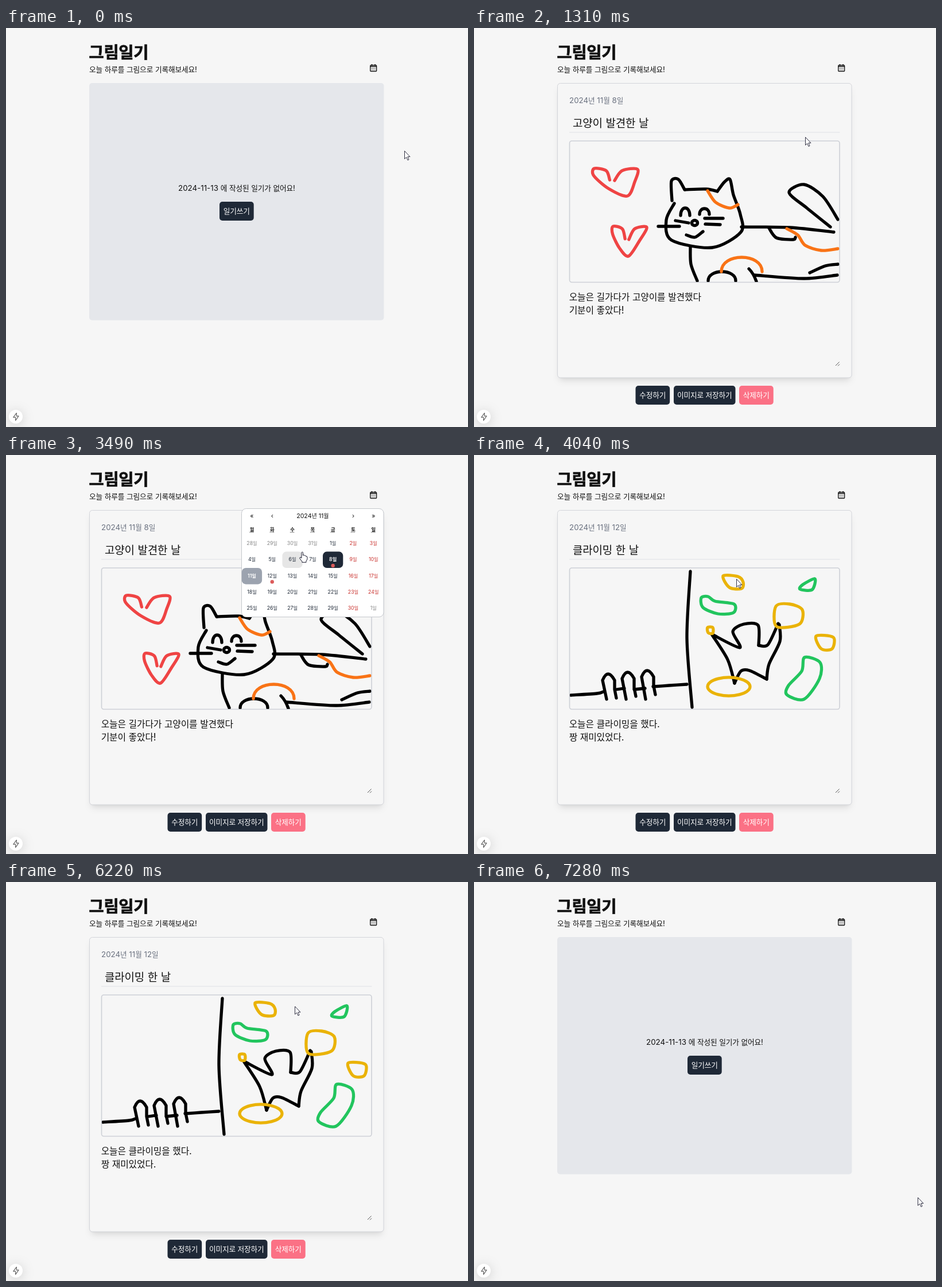
An HTML page that plays this animation: 805x696 px, repeating every 7330 ms.

```html
<!DOCTYPE html>
<html lang="ko">
<head>
<meta charset="utf-8">
<title>그림일기</title>
<style>
  html, body { margin: 0; width: 100%; height: 100%; overflow: hidden; background: #f6f6f6; }
  svg { display: block; }
  text { font-family: Inter, "Noto Sans CJK KR", "Noto Sans CJK", sans-serif; font-size: 13.33px; fill: #111; white-space: pre; }
  .ko { font-size: .95em; letter-spacing: -.01em; word-spacing: .025em; }
  .mid { text-anchor: middle; }
  .white { fill: #fff; font-weight: 500; }
  .title { font-size: 30px; font-weight: 800; stroke: #111; stroke-width: .7; }
  .date { fill: #6b7280; }
  .subject { font-size: 20px; }
  .body { font-size: 16.67px; }
  .btn { fill: #1f2937; }
  .danger { fill: #fb7185; }
  .month { font-size: 10.6px; }
  .day { font-size: 8.7px; fill: #1f2937; }
  .head { font-weight: 700; fill: #111; }
  .weekend { fill: #c9302c; }
  .other { fill: #858585; }
  .on { fill: #fff; font-weight: 600; }
  .ink path { fill: none; stroke-width: 5.3; stroke-linecap: round; stroke-linejoin: round; }
  .shade { filter: drop-shadow(0 8px 6px rgba(0, 0, 0, .1)) drop-shadow(0 3px 2.500px rgba(0, 0, 0, .06)); }
  .badge { filter: drop-shadow(0 3px 10px rgba(0, 0, 0, .17)); }
</style>
</head>
<body>
<svg width="805" height="696" viewBox="0 0 805 696">
  <defs><clipPath id="paper"><rect x="167" y="198" width="469.500" height="245"/></clipPath></defs>

  <text class="title" x="144.500" y="52.500">그림일기</text>
  <text x="145" y="76.800">오늘 하루를 그림으로 기록해보세요!</text>
  <rect id="iconHover" x="621" y="56" width="37" height="27" fill="#e5e7eb"/>
  <g fill="none" stroke="#111" stroke-width="1.400">
    <rect x="634.800" y="65" width="10.800" height="10.500" rx="1"/>
    <path d="M635 67.300H645.500M637.500 63V66M643 63V66"/>
    <path d="M637 70.400H644M637 73H644" stroke-width="1.200" stroke-dasharray="1.200 1.400"/>
  </g>

  <g id="empty">
    <rect x="145" y="96" width="513.500" height="413.700" rx="5" fill="#e5e7eb"/>
    <text class="mid" x="402" y="284">2024-11-13 에 작성된 일기가 없어요!</text>
    <rect class="btn" x="372" y="303" width="59.700" height="33" rx="5"/>
    <text class="mid white" x="401.800" y="323.800">일기쓰기</text>
  </g>

  <g id="diary">
    <rect class="shade" x="148" y="99" width="507.500" height="508.500" rx="5" fill="#f6f6f6"/>
    <rect x="145.500" y="96.500" width="512.500" height="513.500" rx="5" fill="#f6f6f6" stroke="#d3d5da"/>
    <path d="M166 182H637.500" stroke="#dfe1e5"/>
    <rect x="166.500" y="197" width="470.500" height="246.500" rx="4" fill="none" stroke="#cdd0d6" stroke-width="1.600"/>
    <path d="M630 589L636.500 582.500M634 589.500L637 586.500" stroke="#555"/>
    <g id="buttons"></g>
    <g id="cat"></g>
    <g id="climb"></g>
  </g>

  <g id="calendar">
    <rect x="410.500" y="93.500" width="247.500" height="189" rx="8" fill="#fff" stroke="#c4c7cc"/>
    <g id="nav"></g>
    <g id="days"></g>
  </g>

  <circle class="badge" cx="17" cy="678" r="12" fill="#fff"/>
  <path d="M18.300 671.500L12.800 679.200H16.600V684.600L22 676.800H18.300Z" fill="none" stroke="#666" stroke-width="1.200" stroke-linejoin="round"/>

  <g id="cursor" fill="#fff" stroke="#1a1a2e" stroke-linejoin="round">
    <path id="arrow" d="M.5 .5V14.300L3.700 11.400L5.900 16.500L8 15.600L5.900 10.600H10Z" stroke-width=".9"/>
    <path id="hand" d="M-1.500 11V1.800Q-1.500 .5-.2 .5T1.100 1.800V6.500Q1.500 5.500 2.800 5.800T4 7Q5 6.300 6 7.200V8Q8.500 7.500 8.500 9.500V13L6.500 16.500V18.500H-.5V17L-4.500 11.800Q-5 9.800-3.400 9.600Z"/>
  </g>
</svg>
<script>
const LOOP = 7330;
const $ = id => document.getElementById(id);
// "inherit" keeps children of a hidden group hidden
const show = (id, on) => $(id).setAttribute('visibility', on ? 'inherit' : 'hidden');
const label = (cls, x, y, str) => `<text class="${cls}" x="${x}" y="${y}">${str}</text>`;
const range = n => [...Array(n).keys()];

// Smooth line through "x,y x,y ..." points; a trailing z closes it
function curve(str) {
  const closed = str.endsWith('z');
  const p = str.replace('z', '').split(' ').map(s => s.split(',').map(Number));
  const n = p.length, k = 0.15;
  const pt = i => closed ? p[(i + n) % n] : p[Math.max(0, Math.min(n - 1, i))];
  let d = `M${p[0]}`;
  for (let i = 1; i < n + closed; i++) {
    const a = pt(i - 1), b = pt(i);
    const c1 = a.map((v, j) => v + (b[j] - pt(i - 2)[j]) * k);
    const c2 = b.map((v, j) => v - (pt(i + 1)[j] - a[j]) * k);
    d += `C${c1} ${c2} ${b}`;
  }
  return d;
}
const arch = (x, y, w, h) => `M${x} ${y}c0 ${-h * 4 / 3} ${w} ${-h * 4 / 3} ${w} 0`;
const oval = (x, y, rx, ry) => `M${x - rx} ${y}a${rx} ${ry} 0 1 1 0 .1z`;
const heart = (x, y, w, h, tip) => curve([
  [.37, .43], [.29, .1], [.02, .02], [.01, .28], [tip * .45, .74], [tip, 1],
  [tip * .5 + .55, .5], [1, .05], [.65, .1], [.48, .45]
].map(([u, v]) => [x + u * w, y + v * h]).join(' '));

const ink = (color, ...lines) => lines.map(l => `<path stroke="${color}" d="${l[0] === 'M' ? l : curve(l)}"/>`).join('');
const entry = (date, subject, lines, art) =>
  label('date', 166, 130.8, date) + label('subject', 172, 173.3, subject) +
  lines.map((l, i) => label('body', 165.7, 474.8 + i * 23.3, l)).join('') +
  `<g class="ink" clip-path="url(#paper)">${art}</g>`;

$('cat').innerHTML = entry('2024년 11월 8일', '고양이 발견한 날',
  ['오늘은 길가다가 고양이를 발견했다', '기분이 좋았다!'],
  ink('#000',
    '345,301 344,267 356,264 367,282',                                  // head
    '368,282 405,281 424,285',
    '424,285 436,269 446,264 452,291 464,325 465,356 415,383 344,370 335,335 349,306',
    arch(360, 327, 16, 13), arch(393, 325, 17, 10),                     // face
    oval(384.5, 340, 5, 4.5), '370,361 385,365 399,355',
    'M351 336L374 340M321 346H358M402 332H434M403 342L429 343',
    '377,381 378,412 389,441', '466,347 550,348 627,356',               // body
    '621,347 580,314 549,287 575,273 608,294 634,334',
    '514,349 527,366 556,369 560,365',
    arch(408, 441, 48, 16), 'M479 420Q487 428 492 442',
    '489,431 575,437 633,431', '585,427 612,415 634,412') +
  ink('#f97316', '407,284 421,304 445,314 460,308',
    '545,350 564,361 577,379 605,388 634,385', arch(431, 425, 71, 25)) +
  ink('#ef4444', heart(208, 244, 77, 49, .77), heart(241, 345, 60, 53, .47)));

$('climb').innerHTML = entry('2024년 11월 12일', '클라이밍 한 날',
  ['오늘은 클라이밍을 했다.', '짱 재미있었다.'],
  ink('#000',
    '377,203 371,320 380,440',                                          // wall and onlookers
    '169,419 214,416 225,413', '312,404 340,402 371,400',
    ...range(3).map(i => `M${231 + 34 * i} 426L${224 + 34 * i} ${393 - 3 * i}q9-22 21 0l0 16l3 15`),
    ...range(2).map(i => `M${248 + 31 * i} 409L${262 + 36 * i} 407`),
    '415,313 463,336 451,308 470,295 495,297 496,332', '496,332 512,331 530,294', // climber
    '532,296 533,325 514,365 510,391', '510,391 480,376 465,377 454,398',
    '454,398 442,357 415,314') +
  ink('#eab308', '434,211 460,212 469,222 466,233 445,231z', '407,301 416,301 416,311 408,310z',
    '526,264 550,260 572,270 567,295 527,299z', '596,316 626,318 624,338 605,338z', oval(444, 404, 37, 16)) +
  ink('#22c55e', '396,249 408,247 420,255 453,260 452,275 425,277 399,266z', '594,216 573,226 568,234 589,235z',
    '576,353 603,362 602,390 575,426 545,418 548,402 571,377z'));

$('buttons').innerHTML = [['수정하기', 281.5, 59.7, 'btn'], ['이미지로 저장하기', 348, 107.5, 'btn'], ['삭제하기', 462, 59.7, 'danger']]
  .map(([str, x, w, cls]) => `<rect class="${cls}" x="${x}" y="624" width="${w}" height="33" rx="5"/>` +
    label('mid white', x + w / 2, 644.8, str)).join('');

// Month grid: Monday first, starting on 28 October
const GRID = { x: 410.8, y: 140.2, w: 35.3, h: 28.4 };
const TODAY = 11;
const colX = c => GRID.x + GRID.w * (c + .5);

$('nav').innerHTML = [['«', 0], ['‹', 1], ['2024년 11월', 3], ['›', 5], ['»', 6]]
  .map(([str, c]) => label('mid month', colX(c), 110, str)).join('') +
  [...'월화수목금토일'].map((d, c) => label('mid day head', colX(c), 133, d) +
    `<path d="M${colX(c) - 4} 134.800h8" stroke="#111" stroke-dasharray="1 1"/>`).join('');

const tiles = range(35).map(i => {
  const day = i - 3, col = i % 7, row = Math.floor(i / 7);
  const inMonth = day >= 1 && day <= 30;
  const num = day < 1 ? day + 31 : inMonth ? day : day - 30;
  const x = GRID.x + GRID.w * col, y = GRID.y + GRID.h * row;
  const g = document.createElementNS('http://www.w3.org/2000/svg', 'g');
  const dot = day === 8 || day === 12 ? `<circle cx="${colX(col)}" cy="${y + 24.3}" r="3.200" fill="#dc5b5b"/>` : '';
  g.innerHTML = `<rect x="${x}" y="${y}" width="${GRID.w}" height="${GRID.h}" rx="7"/>` +
    label('', colX(col), y + 16.6, num + '일') + dot;
  $('days').append(g);
  const base = 'mid day ' + (!inMonth ? 'other' : col > 4 ? 'weekend' : '');
  return { day, col, row, base, rect: g.children[0], text: g.children[1] };
});

// Hangul runs get their own size and spacing
document.querySelectorAll('text').forEach(t => {
  t.innerHTML = t.textContent.replace(/[가-힣][가-힣 ]*/g, '<tspan class="ko">$&</tspan>');
});

// Pointer moves: from, to, place
const ICON = [642, 69], REST = [694, 214];
const MOVES = [
  [0, 300, ICON],
  [660, 710, [624, 95.5]], [710, 960, [577, 190]],
  [2270, 2770, ICON], [3240, 3690, [457, 216]],
  [4760, 5360, ICON], [5550, 6000, [503, 216.5]],
  [6930, 7280, [773, 550]]
];
const OPEN = [[400, 1210], [2970, 3940], [5400, 6220]];
const PICKS = [[0, 13], [1160, 8], [3890, 12], [6170, 13]];
const SCENES = [[0, 'empty'], [1310, 'cat'], [4040, 'climb'], [6320, 'empty']];
const at = (list, t) => list.filter(e => e[0] <= t).pop()[1];

// Eased in 50 ms steps
function pointer(t) {
  return MOVES.reduce((pos, [t0, t1, goal]) => {
    const p = Math.min(1, Math.max(0, Math.floor((t - t0) / 50) * 50 / (t1 - t0)));
    const e = 1 - (1 - p) ** 1.4;
    return pos.map((v, j) => v + (goal[j] - v) * e);
  }, REST);
}

function render(t) {
  const [x, y] = pointer(t);
  const scene = at(SCENES, t), pick = at(PICKS, t);
  const open = OPEN.some(([a, b]) => t >= a && t < b);
  const onIcon = x >= 621 && x < 658 && y >= 56 && y < 83;
  const col = Math.floor((x - GRID.x) / GRID.w), row = Math.floor((y - GRID.y) / GRID.h);
  let onTile = false;

  for (const tile of tiles) {
    const hover = open && tile.col === col && tile.row === row;
    const active = tile.day === pick, today = tile.day === TODAY;
    onTile = onTile || hover;
    tile.rect.setAttribute('fill', active ? '#1f2937' : today ? '#9ca3af' : hover ? '#e6e6e6' : 'none');
    tile.text.setAttribute('class', active || today ? 'mid day on' : tile.base);
  }
  show('empty', scene === 'empty');
  show('diary', scene !== 'empty');
  show('cat', scene === 'cat');
  show('climb', scene === 'climb');
  show('calendar', open);
  show('iconHover', onIcon);
  show('hand', onIcon || onTile);
  show('arrow', !onIcon && !onTile);
  $('cursor').setAttribute('transform', `translate(${x} ${y})`);
}

const start = performance.now();
function tick() {
  render((performance.now() - start) % LOOP);
  requestAnimationFrame(tick);
}
tick();
</script>
</body>
</html>
```
